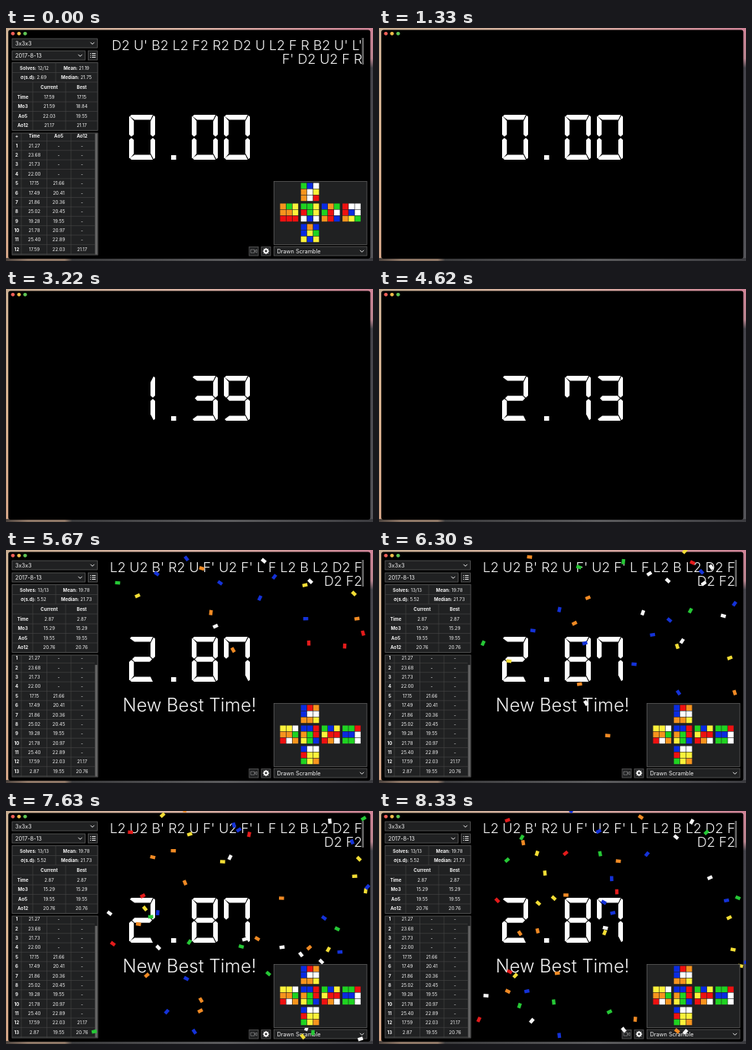
Write an HTML page that moves like this. It is 480x306 px and loops after 8400 ms.

```html
<!DOCTYPE html>
<html lang="en">
<head>
<meta charset="utf-8">
<title>Cube timer</title>
<style>
  html, body { margin: 0; width: 100%; height: 100%; overflow: hidden; background: #000; }
  svg { display: block; width: 480px; height: 306px; font-family: Inter, Roboto, sans-serif; fill: #f4f4f4; }
  .small { font-size: 6px; text-anchor: middle; }
  .bold { font-weight: 700; }
  .select { font-size: 7.3px; }
  .scramble { font-size: 17.8px; font-weight: 300; text-anchor: end; }
  .best { font-size: 23.8px; font-weight: 300; text-anchor: middle; }
  .panel { fill: #202122; stroke: #5c5c5c; stroke-width: .8; }
  .line { stroke: #474747; stroke-width: .6; fill: none; }
  .icon { stroke: #eee; stroke-width: 1; fill: none; }
</style>
</head>
<body>
<svg id="stage" viewBox="0 0 480 306">
  <defs>
    <linearGradient id="top">
      <stop offset="0" stop-color="#c9ae92"/><stop offset=".5" stop-color="#dcb5a6"/><stop offset="1" stop-color="#cf8497"/>
    </linearGradient>
    <linearGradient id="left" x2="0" y2="1">
      <stop offset="0" stop-color="#c9ae92"/><stop offset=".5" stop-color="#d6b18f"/><stop offset="1" stop-color="#cfa184"/>
    </linearGradient>
    <linearGradient id="right" x2="0" y2="1">
      <stop offset="0" stop-color="#cf8497"/><stop offset=".12" stop-color="#b98590"/>
      <stop offset=".16" stop-color="#44434a"/><stop offset="1" stop-color="#55555a"/>
    </linearGradient>
    <linearGradient id="bottom">
      <stop offset="0" stop-color="#4b423d"/><stop offset=".06" stop-color="#8c7565"/><stop offset=".16" stop-color="#8c7565"/>
      <stop offset=".18" stop-color="#39393b"/><stop offset=".6" stop-color="#5a5a5c"/><stop offset="1" stop-color="#3b3b3f"/>
    </linearGradient>
    <clipPath id="listClip"><rect x="8" y="138" width="112" height="160"/></clipPath>
  </defs>
  <rect width="480" height="306" fill="url(#left)"/>
  <rect x="470" width="10" height="306" fill="url(#right)"/>
  <rect width="480" height="8" fill="url(#top)"/>
  <rect x="476" y="4" width="4" height="302" fill="url(#right)"/>
  <rect y="302" width="480" height="4" fill="url(#bottom)"/>
  <rect x="3" y="2.5" width="473.5" height="300.5" rx="3" fill="#000"/>
  <circle cx="9" cy="7.3" r="2.4" fill="#ee5f57"/>
  <circle cx="17" cy="7.3" r="2.4" fill="#eebb4a"/>
  <circle cx="25" cy="7.3" r="2.4" fill="#5fc454"/>
  <g id="ui"></g>
  <g id="clock" fill="#fff"></g>
  <text id="best" class="best" x="240" y="212">New Best Time!</text>
  <g id="confetti"></g>
  <g id="nets"></g>
</svg>
<script>
const LOOP = 8400, HIDE = 980, SHOW = 4900, FADE = 200;
const $ = id => document.getElementById(id);

const text = (x, y, s, cls) => `<text x="${x}" y="${y}" class="${cls}">${s}</text>`;
const rect = (x, y, w, h, attrs) => `<rect x="${x}" y="${y}" width="${w}" height="${h}" ${attrs}/>`;
const panel = (x, y, w, h) => rect(x, y, w, h, 'class="panel"');
const path = (d, cls = 'line') => `<path d="${d}" class="${cls}"/>`;
const select = (x, y, w, s) => panel(x, y, w, 12) + text(x + 4, y + 8.7, s, 'select') +
  path(`M${x + w - 9} ${y + 4.8}l2.5 2.5l2.5-2.5`, 'icon');

// Cube: every sticker is a point with +-2 on the axis of its face.
const FACES = {
  U: { axis: 1, sign: 1, color: '#fff', at: [1, 0], pos: (c, r) => [c, 2, r] },
  L: { axis: 0, sign: -1, color: '#f7941d', at: [0, 1], pos: (c, r) => [-2, -r, c] },
  F: { axis: 2, sign: 1, color: '#1fd321', at: [1, 1], pos: (c, r) => [c, -r, 2] },
  R: { axis: 0, sign: 1, color: '#ee1111', at: [2, 1], pos: (c, r) => [2, -r, -c] },
  B: { axis: 2, sign: -1, color: '#0a2be0', at: [3, 1], pos: (c, r) => [-c, -r, -2] },
  D: { axis: 1, sign: -1, color: '#fdf23a', at: [1, 2], pos: (c, r) => [c, -2, -r] }
};
const SPOTS = [-1, 0, 1];

function eachSticker(visit) {
  for (const face of Object.values(FACES))
    for (const r of SPOTS) for (const c of SPOTS) visit(face, c, r);
}

function scrambled(moves) {
  const stickers = [];
  eachSticker((face, c, r) => stickers.push({ p: face.pos(c, r), color: face.color }));
  for (const move of moves.split(' ')) {
    const { axis, sign } = FACES[move[0]];
    const turns = { 2: 2, "'": 3 }[move[1]] || 1;
    const b = (axis + 1) % 3, c = (axis + 2) % 3;
    for (const { p } of stickers) {
      if (p[axis] * sign < 1) continue;
      for (let i = 0; i < turns; i++) [p[b], p[c]] = [sign * p[c], -sign * p[b]];
    }
  }
  return new Map(stickers.map(s => [s.p.map(v => v + 0).join(), s.color]));
}

function netView(moves) {
  const cube = scrambled(moves);
  let out = panel(350.5, 201.5, 121.5, 83);
  eachSticker((face, c, r) => {
    const x = 358.5 + face.at[0] * 27.2 + (c + 1) * 8.1;
    const y = 203.5 + face.at[1] * 27 + (r + 1) * 8.1;
    const key = face.pos(c, r).map(v => v + 0).join();
    out += rect(x, y, 7.5, 7.5, `fill="${cube.get(key)}"`);
  });
  return out;
}

const SOLVES = `21.27 - -|23.68 - -|21.73 - -|22.00 - -|17.15 21.66 -|17.49 20.41 -|21.86 20.36 -
25.02 20.45 -|19.28 19.55 -|21.78 20.97 -|25.40 22.89 -|17.59 22.03 21.17|2.87 19.55 20.76`
  .split(/[|\n]/).map(s => s.trim().split(' '));

const SESSIONS = [
  {
    count: 12, mean: '21.19', sd: '2.69', median: '21.75', scroll: 0,
    stats: ['17.59 17.15', '21.59 18.84', '22.03 19.55', '21.17 21.17'],
    scramble: ["D2 U' B2 L2 F2 R2 D2 U L2 F R B2 U' L'", "F' D2 U2 F R"]
  },
  {
    count: 13, mean: '19.78', sd: '5.52', median: '21.73', scroll: 12.4,
    stats: ['2.87 2.87', '15.29 15.29', '19.55 19.55', '20.76 20.76'],
    scramble: ["L2 U2 B' R2 U F' U2 F' L F L2 B L2 D2 F", 'D2 F2']
  }
];

function statsView(s) {
  const pair = (x, y, k, v) => text(x, y, `<tspan class="bold">${k}:</tspan> ${v}`, 'small');
  let out = panel(8, 45.5, 112, 89) +
    path('M8 58.5H120M8 71H120M8 84H120M8 97H120M8 109.5H120M8 122H120M65 45.5V71M35 71V134M78 71V134') +
    pair(37, 54.6, 'Solves', `${s.count}/${s.count}`) + pair(92, 54.6, 'Mean', s.mean) +
    pair(36, 66.8, 'σ(s.d)', s.sd) + pair(92, 66.8, 'Median', s.median) +
    text(56.5, 79.8, 'Current', 'small bold') + text(99, 79.8, 'Best', 'small bold');
  ['Time', 'Mo3', 'Ao5', 'Ao12'].forEach((name, i) => {
    const y = 92.6 + i * 12.5, [now, best] = s.stats[i].split(' ');
    out += text(22, y, name, 'small bold') + text(56.5, y, now, 'small') + text(99, y, best, 'small');
  });
  return out;
}

function listView(s) {
  const rows = [['+', 'Time', 'Ao5', 'Ao12'], ...SOLVES.slice(0, s.count).map((v, i) => [i + 1, ...v])];
  let out = path('M20 138V298M53.5 138V298M85 138V298');
  rows.forEach((row, i) => {
    const y = 144.4 + i * 12.36 - s.scroll;
    out += path(`M8 ${y + 4}H116`);
    row.forEach((cell, j) =>
      out += text([14, 37, 69, 99.5][j], y, cell, i && j ? 'small' : 'small bold'));
  });
  return panel(8, 138, 112, 160) + `<g clip-path="url(#listClip)">${out}</g>` +
    rect(116.5, 138.5 + s.scroll, 3, 159 - s.scroll, 'fill="#666"');
}

function controls() {
  let gear = '';
  for (let a = 0; a < 360; a += 45)
    gear += rect(339.2, 289, 1.8, 2.4, `fill="#eee" transform="rotate(${a} 340.1 293)"`);
  return select(8, 14, 111.5, '3x3x3') + select(8, 30, 95.5, '2017-8-13') +
    panel(107.5, 30, 12, 12) + path('M110 33.5h1M112.3 33.5h5M110 36h1M112.3 36h5M110 38.5h1M112.3 38.5h5', 'icon') +
    panel(318, 287.5, 12, 11.5) + path('M320 291h5v4.2h-5zM325 293l3-2v4.2z', 'icon" opacity=".35') +
    panel(334, 287.5, 12, 11.5) + gear + '<circle cx="340.1" cy="293" r="2.2" stroke="#eee" stroke-width="1.6" fill="none"/>' +
    select(350.5, 287, 121.5, 'Drawn Scramble');
}

const group = html => `<g>${html}</g>`;
$('ui').innerHTML = SESSIONS.map(s => group(
  controls() + statsView(s) + listView(s) + rect(465.5, 13, 2.5, 35, 'fill="#666"') +
  s.scramble.map((line, i) => text(466, 29.3 + i * 18, line, 'scramble')).join('')
)).join('');
$('nets').innerHTML = SESSIONS.map(s => group(netView(s.scramble.join(' ')))).join('');

// Seven segments, a to g.
const SEGMENTS = [
  '1,2 3,0 31,0 28,6.5 7,6.5', '32,.8 34,2.5 34,26 31,28.8 28,26 28,8.5',
  '32,58.2 34,56.5 34,33 31,30.2 28,33 28,50.5', '1,57 3,59 31,59 28,52.5 7,52.5',
  '0,57 2,56.5 6.2,51 6.2,33 3,30.2 0,33', '0,2 1.5,2.4 6.2,8 6.2,26 3,28.8 0,26',
  '4,29.5 7,26.3 27,26.3 30,29.5 27,32.7 7,32.7'
];
const LIT = ['abcdef', 'bc', 'abged', 'abgcd', 'fgbc', 'afgcd', 'afgedc', 'fabc', 'abcdefg', 'abcdfg'];
$('clock').innerHTML = rect(216, 167, 6.5, 6, '') + [161, 243, 285].map(x =>
  `<g class="digit" transform="translate(${x} 114)">` +
  SEGMENTS.map(p => `<polygon points="${p}"/>`).join('') + '</g>').join('');
const digits = [...document.querySelectorAll('.digit')];

const TICKS = [[0, 0], [1785, 0], [2030, 235], [3220, 1395], [4620, 2735], [4760, 2870], [LOOP, 2870]];
function clockAt(t) {
  const i = TICKS.findIndex(k => k[0] > t);
  const [t0, v0] = TICKS[i - 1], [t1, v1] = TICKS[i];
  return v0 + (v1 - v0) * (t - t0) / (t1 - t0);
}

function showClock(t) {
  const step = Math.floor((t + 20) / 70) * 70;
  const value = String(Math.floor(clockAt(Math.min(step, LOOP - 1)) / 10)).padStart(3, '0');
  digits.forEach((digit, i) => [...digit.children].forEach((seg, j) =>
    seg.style.display = LIT[value[i]].includes('abcdefg'[j]) ? '' : 'none'));
}

let seed = 13;
const random = () => (seed = seed * 16807 % 2147483647) / 2147483647;
const PAPER = { b: '#1432d8', r: '#e31b1b', y: '#f2dd35', g: '#26c836', o: '#f08a24', w: '#f6f6f6' };

// First pieces: colour, x, y at BURST. The rest rain in at a steady rate.
const BURST = 5670;
const FIRST = `g146,43 b197,31 b236,11 o256,24 y172,60 o268,82 b280,43 w274,100 o297,131 b332,63 w337,14
  b351,35 y391,46 b392,90 r396,122 r443,126 r467,109 w398,41 y455,57 o459,90`.split(/\s+/);
const pieces = FIRST.map(s => {
  const [x, y] = s.slice(1).split(',').map(Number);
  return { color: s[0], x, y, t: BURST, vy: 100 + y * .6 };
});
for (let i = 0; i < 68; i++)
  pieces.push({
    color: 'brygow'[Math.floor(random() * 6)], x: 125 + random() * 345, y: -8,
    t: BURST + i * 40, vy: 105 + random() * 65
  });
for (const p of pieces) {
  p.vx = (random() - .5) * 36;
  p.angle = random() * 360;
  p.spin = (random() - .5) * 360;
}
$('confetti').innerHTML = pieces.map(p => rect(-2.2, -3.3, 4.4, 6.6, `fill="${PAPER[p.color]}"`)).join('');
const paper = [...$('confetti').children];

function showConfetti(t) {
  pieces.forEach((p, i) => {
    const s = (t - p.t) / 1000, y = p.y + p.vy * s;
    const on = t >= SHOW && y > -8 && y < 300;
    paper[i].style.display = on ? '' : 'none';
    if (on) paper[i].setAttribute('transform',
      `translate(${p.x + p.vx * s} ${y}) rotate(${p.angle + p.spin * s})`);
  });
}

const clamp = v => Math.max(0, Math.min(1, v));
function draw(t) {
  const before = 1 - clamp((t - HIDE) / FADE), after = clamp((t - SHOW) / FADE);
  for (const id of ['ui', 'nets'])
    [before, after].forEach((o, i) => $(id).children[i].setAttribute('opacity', o));
  $('best').setAttribute('opacity', after);
  showClock(t);
  showConfetti(t);
}

const start = performance.now();
function tick() {
  draw((performance.now() - start) % LOOP);
  requestAnimationFrame(tick);
}
tick();
</script>
</body>
</html>
```
